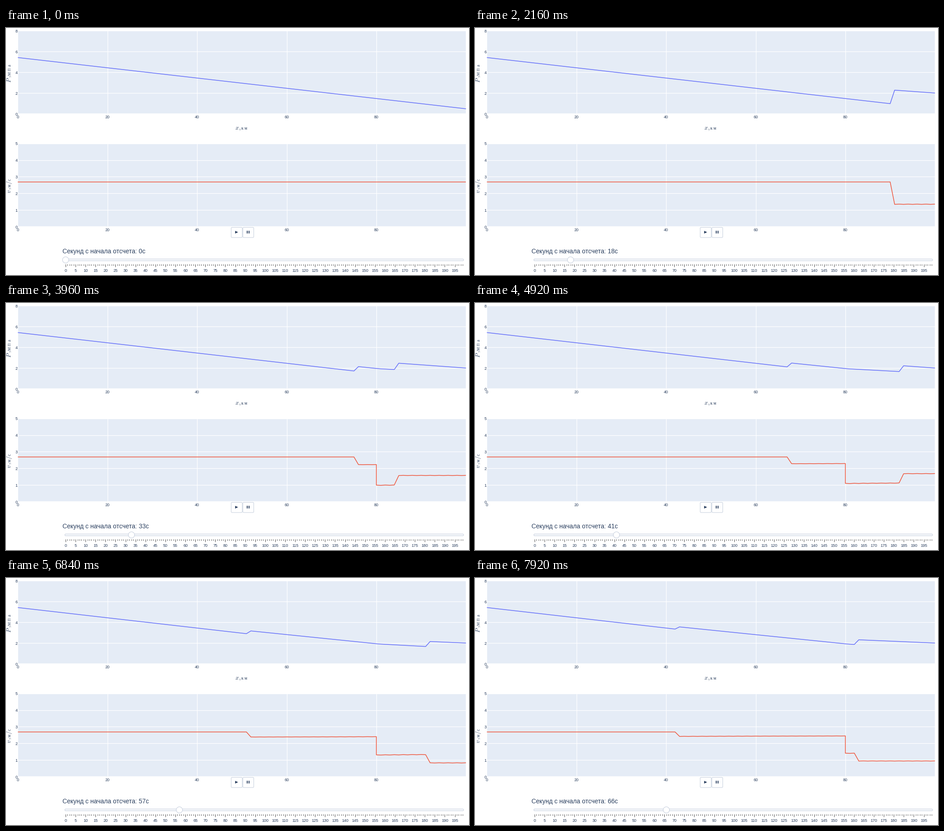
Animation, 1025 px wide and 547 px high, one loop 8000 ms. Source, as a matplotlib script:

```python
import numpy as np
import matplotlib.pyplot as plt
from matplotlib.animation import FuncAnimation
from matplotlib.patches import Circle, FancyBboxPatch, Polygon, Rectangle

W, H, DPI = 1025, 547, 64
INK, BORDER, PANEL = "#2a3f5f", "#bec8d9", "#e5ecf6"
LEFT, RIGHT = 26.3, 1018.3
SLIDER_X, SLIDER_STEP, SLIDER_Y = 132, 4.418, 513.6

plt.rcParams["mathtext.fontset"] = "cm"
fig = plt.figure(figsize=(W / DPI, H / DPI), dpi=DPI, facecolor="white")
ax = fig.add_axes([0, 0, 1, 1])
ax.set(xlim=(0, W), ylim=(H, 0))
ax.axis("off")


def pt(pixels):
    return pixels * 72 / DPI


def text(x, y, s, size=9, font="Liberation Sans", ha="center", rotation=0):
    return ax.text(x, y, s, fontsize=pt(size), family=font, color=INK, ha=ha,
                   va="baseline", rotation=rotation, rotation_mode="anchor")


def line(x, y, color, width, z=2):
    return ax.plot(x, y, color=color, lw=pt(width), zorder=z,
                   solid_capstyle="butt", solid_joinstyle="round")[0]


def box(x0, y0, x1, y1, radius, fill):
    ax.add_patch(FancyBboxPatch(
        (x0, y0), x1 - x0, y1 - y0, fc=fill, ec=BORDER, lw=pt(0.9), zorder=4,
        boxstyle=f"round,pad=0,rounding_size={radius}"))


def to_x(km):
    return LEFT + (RIGHT - LEFT) * np.asarray(km) / 100


class Panel:
    def __init__(self, top, bottom, vmax, step, color):
        self.bottom, self.scale = bottom, (bottom - top) / vmax
        ax.add_patch(Rectangle((LEFT, top), RIGHT - LEFT, bottom - top,
                               fc=PANEL, lw=0, zorder=1))
        for km in range(0, 100, 20):
            line([to_x(km)] * 2, [top, bottom], "white", 1.3 if km else 1.7)
            text(to_x(km), bottom + 9.9, str(km))
        for value in range(0, vmax + 1, step):
            y = self.to_y(value)
            line([LEFT, RIGHT], [y, y], "white", 1.3 if value else 1.7)
            text(25.6, y + 3.2, str(value), ha="right")
        self.curve = line([], [], color, 1.5, 3)

    def to_y(self, value):
        return self.bottom - self.scale * np.asarray(value)


pressure = Panel(6.3, 190.4, 8, 2, "#636efa")
speed = Panel(255.6, 440.3, 5, 1, "#ef553b")

# Axis titles, set letter by letter
SERIF = "Liberation Serif"
for x, s, size in [(511.7, "$x$", 13.5), (517.3, "$,$", 13.5),
                   (523.4, "к", 9.5), (530.4, "м", 9.5)]:
    text(x, 225.3, s, size, SERIF)
for y, s, size in [(114.8, "$P$", 13.5), (107.6, "$,$", 13.5), (101, "М", 9),
                   (92.3, "П", 9), (83, "а", 9.5),
                   (362.3, "$v$", 13.5), (356, "$,$", 13.5), (349.2, "м", 9.5),
                   (341.8, "$/$", 13.5), (335.5, "с", 9.5)]:
    text(10.7, y, s, size, SERIF, rotation=90)

# Play and pause buttons
box(498.5, 441.5, 523, 464, 2, "white")
box(524.3, 441.5, 548.5, 464, 2, "white")
ax.add_patch(Polygon([(507.3, 449.2), (513.8, 452.2), (507.3, 455.2)],
                     fc=INK, lw=0, zorder=5))
for x in (533.3, 536.8):
    ax.add_patch(Rectangle((x, 449.2), 2, 6, fc=INK, lw=0, zorder=5))

# Slider
caption = text(125, 499.3, "", 13.9, ha="left")
box(130.3, 511.6, 1013, 515.6, 1.8, "#f8fafc")
handle = ax.add_patch(Circle((SLIDER_X, SLIDER_Y), 6.9, fc="white",
                             ec=BORDER, lw=pt(0.9), zorder=5))
seconds = np.arange(200)
tick_x = SLIDER_X + SLIDER_STEP * seconds
ax.vlines(tick_x, 523.2, np.where(seconds % 5, 526.4, 528.6),
          color="#333333", lw=pt(0.9))
for sec in seconds[::5]:
    text(tick_x[sec], 539.9, str(sec))

# The pump station at 80 km holds two points, one on each side
km = np.r_[0:81, 80:101]
downstream = np.arange(len(km)) > 80
ripple = np.where(km % 2, -1, 1)


def profiles(s):
    """Pressure and speed along the pipe after s seconds."""
    p = 5.43 - 0.0493 * km
    v = np.full(len(km), 2.69)

    # Wave from the closed end travels left at 1 km/s
    front = 108 - s
    passed = km > front
    p[passed] = (2.015 + 0.031 * (100 - km))[passed]
    v[passed] = (np.interp(s, [9, 11, 24, 41, 48], [1.2, 1.23, 1.46, 1.69, 1.76])
                 + 0.007 * ripple)[passed]
    if s < 29:
        return p, v

    # It splits at the station into a transmitted and a reflected part
    knots = [29, 41, 48, 57, 66]
    station = np.interp(s, knots, [1.98, 1.966, 1.957, 1.948, 1.94])
    upstream = passed & ~downstream
    p[upstream] = (station + 0.044 * (80 - km))[upstream]
    v[upstream] = (np.interp(s, knots, [2.2, 2.285, 2.33, 2.385, 2.425])
                   + 0.0007 * (km - front) + 0.003 * ripple)[upstream]

    reflected = downstream & (km < s + 52)
    drop = np.where(km > 80, 0.012 + 0.023 * (km - 80), 0)
    p[reflected] = (station - drop)[reflected]
    v[reflected] = (np.interp(s, knots, [0.94, 1.1, 1.19, 1.31, 1.41])
                    + 0.0022 * (km - 80) + 0.007 * ripple)[reflected]

    # The reflected part returns from the far end
    echo = downstream & (km > 148 - s)
    p[echo] = (2.015 + 0.0184 * (100 - km))[echo]
    v[echo] = (0.835 + 0.0127 * (s - 57) + 0.005 * ripple)[echo]
    return p, v


def update(frame):
    s = frame // 3
    p, v = profiles(s)
    pressure.curve.set_data(to_x(km), pressure.to_y(p))
    speed.curve.set_data(to_x(km), speed.to_y(v))
    handle.center = (SLIDER_X + SLIDER_STEP * s, SLIDER_Y)
    caption.set_text(f"Секунд с начала отсчета: {s}с")
    return pressure.curve, speed.curve, handle, caption


anim = FuncAnimation(fig, update, frames=200, interval=40, repeat=True,
                     repeat_delay=0, init_func=lambda: update(0))
plt.show()
```
